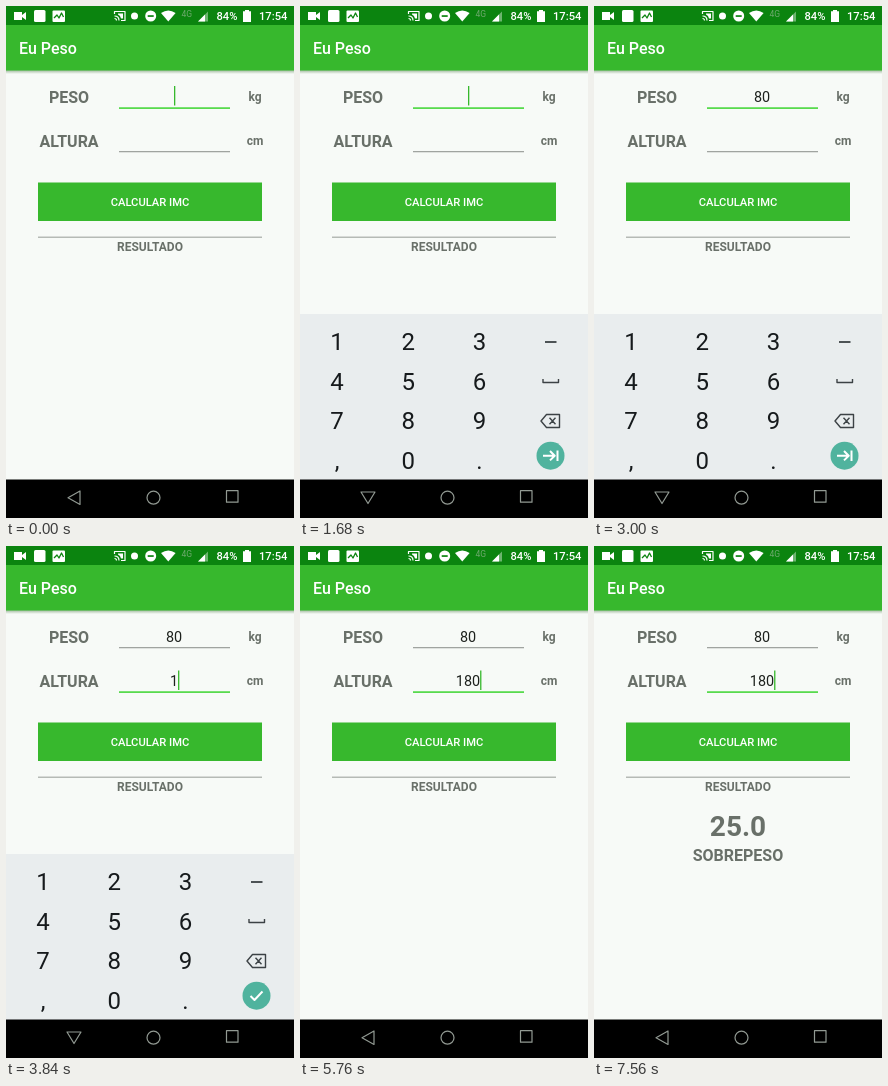
An HTML page for the animation above (7920 ms loop, 288 px wide and 512 px high).

```html
<!DOCTYPE html>
<html lang="pt">
<head>
<meta charset="utf-8">
<style>
  html, body { margin: 0; width: 100%; height: 100%; overflow: hidden; background: #000; }
  svg { display: block; width: 288px; height: 512px; font-family: Roboto, sans-serif; }
  .mid { text-anchor: middle; }
  .label { fill: #697069; font-weight: 700; }
  .input { fill: #1d211d; font-size: 14.4px; }
  .status { fill: #fff; font-size: 11.2px; font-weight: 500; }
  .key { fill: #161a1c; font-size: 24px; }
  .stroke { fill: none; stroke-linejoin: round; }
</style>
</head>
<body>
<svg viewBox="0 0 288 512">
  <defs>
    <linearGradient id="shade" x2="0" y2="1">
      <stop stop-color="#9db79b"/><stop offset="1" stop-color="#f7faf7"/>
    </linearGradient>
  </defs>
  <rect width="288" height="512" fill="#f7faf7"/>
  <rect y="64" width="288" height="4" fill="url(#shade)"/>
  <rect width="288" height="64.5" fill="#37b82d"/>
  <rect width="288" height="19" fill="#0b840f"/>

  <!-- status bar -->
  <g fill="#fff">
    <path d="M8 6h8v3l4-3v8l-4-3v3h-8z"/>
    <rect x="28" y="4" width="11.5" height="12" rx="1.5"/>
    <rect x="46.500" y="4.500" width="12.500" height="11.500" rx="1"/>
    <path d="M48 12l3-3 2 3 2.500-5 2 4" class="stroke" stroke="#0b840f" stroke-width="1.300"/>
    <path d="M108.500 8V5.500h10.500v9h-4M108.500 10q4.500 0 4.500 4.500M108.500 12.500q2 0 2 2" class="stroke" stroke="#fff" stroke-width="1.200"/>
    <path d="M112 7.500h5v5h-2q-.5-3-3-4z"/>
    <circle cx="128.500" cy="10" r="3.500"/>
    <circle cx="144.700" cy="10" r="5.500"/>
    <rect x="141.700" y="9.200" width="6" height="1.700" fill="#0b840f"/>
    <path d="M155 7q7.300-5 14.600 0L162.300 15.500z"/>
    <path d="M192 15.500L202 5.500v10z" opacity=".4"/>
    <path d="M192 15.500l7-7v7z"/>
    <path d="M239 4h4v1.300h2v10.700h-8v-10.700h2z"/>
  </g>
  <text x="175.500" y="11" font-size="8.500" fill="#6eaa6e">4G</text>
  <text class="status" x="210.500" y="14">84%</text>
  <text class="status" x="253" y="14">17:54</text>

  <text x="13" y="48" font-size="16" font-weight="500" fill="#fff">Eu Peso</text>

  <!-- form -->
  <g class="label mid">
    <text x="63" y="96.500" font-size="16">PESO</text>
    <text x="63" y="140.500" font-size="16">ALTURA</text>
    <text x="249" y="94.500" font-size="12">kg</text>
    <text x="249" y="138.500" font-size="12">cm</text>
    <text x="144" y="244.700" font-size="12">RESULTADO</text>
    <g id="result">
      <text x="144" y="290" font-size="28">25.0</text>
      <text x="144" y="314.500" font-size="16">SOBREPESO</text>
    </g>
  </g>
  <rect id="weightLine" x="113" width="111"/>
  <rect id="heightLine" x="113" width="111"/>
  <text id="weight" class="input mid" x="168" y="95.500"/>
  <text id="height" class="input mid" x="168" y="139.800"/>
  <rect id="cursor" width="1.300" height="19.500" fill="#37b82d"/>
  <rect x="32" y="176.500" width="224" height="38.500" fill="#37b82d"/>
  <text class="mid" x="144" y="200" font-size="11.200" font-weight="500" fill="#fff">CALCULAR IMC</text>
  <rect x="32" y="230.700" width="224" height=".9" fill="#8b908b"/>

  <!-- keyboard -->
  <g id="keyboard">
    <rect y="308" width="288" height="166" fill="#e9edee"/>
    <g id="keys" class="key mid"></g>
    <g class="stroke" stroke="#3c4245" stroke-width="1.400">
      <path d="M245 336h11.500" stroke-width="1.800"/>
      <path d="M243 373v3.500h15.500v-3.500"/>
      <path d="M246.500 408.500h13v13h-13l-5.500-6.500zM249.500 411.700l6 6.500M255.500 411.700l-6 6.500"/>
    </g>
    <circle cx="250.500" cy="449.700" r="14" fill="#50b39e"/>
    <path id="action" class="stroke" stroke="#fff" stroke-width="2"/>
  </g>

  <!-- navigation bar -->
  <rect y="473.500" width="288" height="38.500"/>
  <g class="stroke" stroke="#929a93" stroke-width="1.200">
    <path id="back"/>
    <circle cx="147.500" cy="491.700" r="6.500"/>
    <rect x="220.500" y="484.700" width="11.500" height="11.500"/>
  </g>
</svg>
<script>
const LOOP = 7920;
const FOCUS_HEIGHT = 3050, SHOW_RESULT = 6100;
const KEYBOARD_IN = 1440, KEYBOARD_OUT = 5520, SLIDE = 220;
const weightKeys = [2040, 2450], heightKeys = [3700, 4150, 4540];
const blinkStarts = [-150, 1300, ...weightKeys, FOCUS_HEIGHT, ...heightKeys];
const NEXT = "M243 449.700h11M250 445l4.700 4.700-4.700 4.700M257.500 444.500v10.500";
const DONE = "M244.500 450l4 4 8-8.500";

const $ = id => document.getElementById(id);
const set = (id, attrs) => {
  for (const name in attrs) $(id).setAttribute(name, attrs[name]);
};
const typed = (text, times, t) => text.slice(0, times.filter(at => at <= t).length);
const ease = x => 1 - (1 - Math.min(1, Math.max(0, x))) ** 2;

["123", "456", "789", ",0."].forEach((row, r) => [...row].forEach((char, c) => {
  const key = document.createElementNS("http://www.w3.org/2000/svg", "text");
  key.setAttribute("x", 37 + c * 71.2);
  key.setAttribute("y", 344 + r * 39.6);
  key.textContent = char;
  $("keys").append(key);
}));

function drawLine(id, y, focused) {
  set(id, { y, height: focused ? 1.6 : 0.9, fill: focused ? "#48d83c" : "#7c817c" });
}

function render(t) {
  const onHeight = t >= FOCUS_HEIGHT;
  const weight = typed("80", weightKeys, t);
  const height = typed("180", heightKeys, t);
  $("weight").textContent = weight;
  $("height").textContent = height;
  drawLine("weightLine", 101.3, !onHeight);
  drawLine("heightLine", 145.3, onHeight);

  const lastStart = blinkStarts.filter(at => at <= t).pop();
  const active = onHeight ? height : weight;
  set("cursor", {
    x: 168 + active.length * 4.04,
    y: onHeight ? 124.5 : 80,
    opacity: (t - lastStart) % 1000 < 500 ? 1 : 0
  });

  const shown = ease((t - KEYBOARD_IN) / SLIDE) - ease((t - KEYBOARD_OUT) / SLIDE);
  set("keyboard", { transform: `translate(0 ${(1 - shown) * 166})` });
  set("action", { d: onHeight ? DONE : NEXT });
  const open = t >= KEYBOARD_IN && t < KEYBOARD_OUT;
  set("back", { d: open ? "M61 486h14l-7 11.500z" : "M74 485v13.500l-12-6.700z" });
  set("result", { opacity: t >= SHOW_RESULT ? 1 : 0 });
}

function frame() {
  render(performance.now() % LOOP);
  requestAnimationFrame(frame);
}
frame();
</script>
</body>
</html>
```
